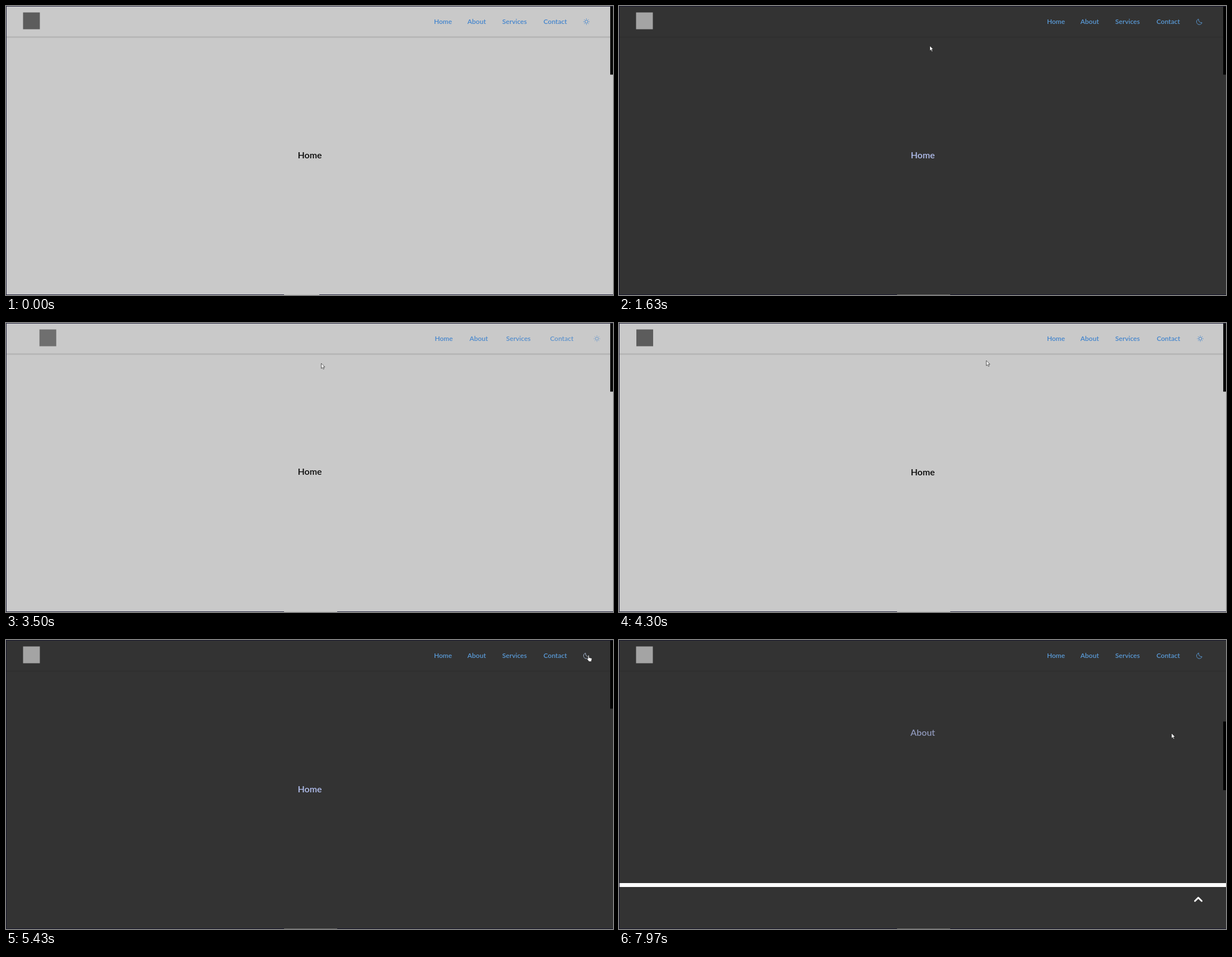
An HTML page with a canvas that plays this animation: 1085x516 px, repeating every 8 s.

```html
<!DOCTYPE html>
<html lang="en">
<head>
<meta charset="utf-8">
<title>Landing page</title>
<style>
html, body { margin: 0; width: 100%; height: 100%; overflow: hidden; background: #c9c9c9; }
canvas { display: block; }
</style>
</head>
<body>
<canvas id="stage" width="1085" height="516"></canvas>
<script>
const W = 1085, H = 516, LOOP = 8000;
const SECTION = 525, PAGE = 2173;
const RELOAD = 1900, FIRST_PAINT = 2170;
const c = document.getElementById('stage').getContext('2d');

const THEMES = {
  light: { bg: '#c9c9c9', title: '#000', link: '#4284cd', logo: '#5c5c5c', shadow: '#b7b7b7', edge: '#23233d', strip: '#bdbdbd', thumb: '#0a0a0a' },
  dark: { bg: '#333', title: '#b4c1f1', link: '#5a9bd8', logo: '#a4a4a4', shadow: '#303030', edge: '#15152b', strip: '#666', thumb: '#000' }
};
const LINKS = [['Home', 781], ['About', 841.3], ['Services', 909], ['Contact', 981.7]];

// Cursor path: time, x, y
const PATH = [[1170, 555.5, 71], [3170, 555.5, 71], [3500, 563.5, 72], [4170, 563.5, 72],
  [4700, 940, 52], [4900, 1010, 34], [5030, 1040, 27], [6300, 1040, 27], [6630, 987.5, 166.5]];

const MOON = new Path2D('M-1.6-4.6a5 5 0 1 0 6.2 6.4a5.5 5.5 0 0 1-6.2-6.4z');
const ARROW = new Path2D('M0 0v9.2l2.1-2 1.5 3.2 1.6-.7-1.5-3.1h2.8z');
const HAND = new Path2D('M2.2 6.6V1a1 1 0 0 1 2 0v3.6l4 .7q1.2.3 1.1 1.6L8.6 9.6v2H3.4v-1.2L.5 7.2q-.3-1 .6-1.1z');

// CSS "ease" timing
function ease(x) {
  if (x <= 0) return 0;
  if (x >= 1) return 1;
  let lo = 0, hi = 1, s;
  for (let i = 0; i < 24; i++) {
    s = (lo + hi) / 2;
    const bx = .75 * s * (1 - s) ** 2 + .75 * s * s * (1 - s) + s ** 3;
    if (bx < x) lo = s; else hi = s;
  }
  return .3 * s * (1 - s) ** 2 + 3 * s * s * (1 - s) + s ** 3;
}

function reveal(t, start) {
  if (t < RELOAD) return 1;
  return t < FIRST_PAINT ? 0 : ease((t - start) / 2000);
}

function scrollAt(t) {
  if (t < 6770) return 0;
  if (t < 6830) return 256;
  if (t < 7100) return 261;
  return t < 7170 ? 600 : 613;
}

function rect(x, y, w, h, fill) {
  c.fillStyle = fill;
  c.fillRect(x, y, w, h);
}

function text(str, x, y, size, fill, alpha) {
  c.globalAlpha = alpha;
  c.font = `600 ${size}px Lato, "Noto Sans", sans-serif`;
  c.fillStyle = fill;
  c.fillText(str, x, y);
  c.globalAlpha = 1;
}

function title(str, section, scroll, p, fill) {
  text(str, 543, section * SECTION + 272 - scroll - 45 * (1 - p), 16, fill, p);
}

function themeIcon(dark, x, color, alpha) {
  c.save();
  c.translate(x, 28);
  c.globalAlpha = alpha;
  c.strokeStyle = color;
  c.lineWidth = 1;
  if (dark) {
    c.stroke(MOON);
  } else {
    c.beginPath();
    c.arc(0, 0, 2.7, 0, 7);
    for (let i = 0; i < 8; i++) {
      const cx = Math.cos(i * Math.PI / 4), cy = Math.sin(i * Math.PI / 4);
      c.moveTo(cx * 4.2, cy * 4.2);
      c.lineTo(cx * 5.6, cy * 5.6);
    }
    c.stroke();
  }
  c.restore();
}

function header(t, dark, th) {
  rect(0, 0, W, 54, th.bg);
  rect(0, 54, W, 3, th.shadow);

  const logo = reveal(t, 2450);
  c.globalAlpha = logo;
  rect(30.5 + 169 * (1 - logo), 11.5, 30, 30, th.logo);
  c.globalAlpha = 1;

  LINKS.forEach(([name, x], i) => {
    const p = reveal(t, 1925 + 200 * i);
    text(name, x + 56 * (1 - p), 32, 12, th.link, p);
  });
  const p = reveal(t, 2725);
  const hovered = t >= 5030 && t < 6350;
  themeIcon(dark, 1037.5 + 56 * (1 - p), hovered ? '#a9bbd6' : th.link, p);
}

function upButton() {
  c.beginPath();
  c.moveTo(1029.5, 466);
  c.lineTo(1035.5, 460.2);
  c.lineTo(1041.5, 466);
  c.strokeStyle = '#fff';
  c.lineWidth = 3;
  c.lineCap = c.lineJoin = 'round';
  c.stroke();
}

function cursor(t, dark) {
  if (t < PATH[0][0]) return;
  let [, x, y] = PATH[PATH.length - 1];
  const i = PATH.findIndex(k => k[0] > t);
  if (i > 0) {
    const [t0, x0, y0] = PATH[i - 1], [t1, x1, y1] = PATH[i];
    const f = (t - t0) / (t1 - t0);
    x = x0 + (x1 - x0) * f;
    y = y0 + (y1 - y0) * f;
  }
  const hand = t >= 5170 && t < 6350;
  const shape = hand ? HAND : ARROW;
  c.save();
  c.translate(hand ? x - 2 : x, y);
  c.fillStyle = '#fff';
  c.strokeStyle = dark ? '#222' : '#333';
  c.lineWidth = .8;
  c.lineJoin = 'miter';
  c.fill(shape);
  c.stroke(shape);
  c.restore();
}

function draw(t) {
  const dark = (t >= 1630 && t < RELOAD) || t >= 5430;
  const th = dark ? THEMES.dark : THEMES.light;
  const scroll = scrollAt(t);

  rect(0, 0, W, H, th.bg);
  for (let i = 1; i < 4; i++) rect(0, i * SECTION - 3 - scroll, W, 7, '#fff');
  c.textAlign = 'center';
  title('Home', 0, scroll, reveal(t, 1955), th.title);
  if (t >= 7100) {
    title('About', 1, scroll, reveal(t, 7130), th.title);
    upButton();
  }
  header(t, dark, th);

  rect(1080, scroll * H / PAGE, 5, H * H / PAGE, th.thumb);
  rect(0, 0, W, 1, th.edge);
  rect(0, 0, 1, H, th.edge);
  rect(0, H - 1, W, 1, th.edge);
  rect(497, H - 1, t < 500 ? 63 : 95, 1, th.strip);
  cursor(t, dark);
}

function frame() {
  draw(performance.now() % LOOP);
  requestAnimationFrame(frame);
}
frame();
</script>
</body>
</html>
```
